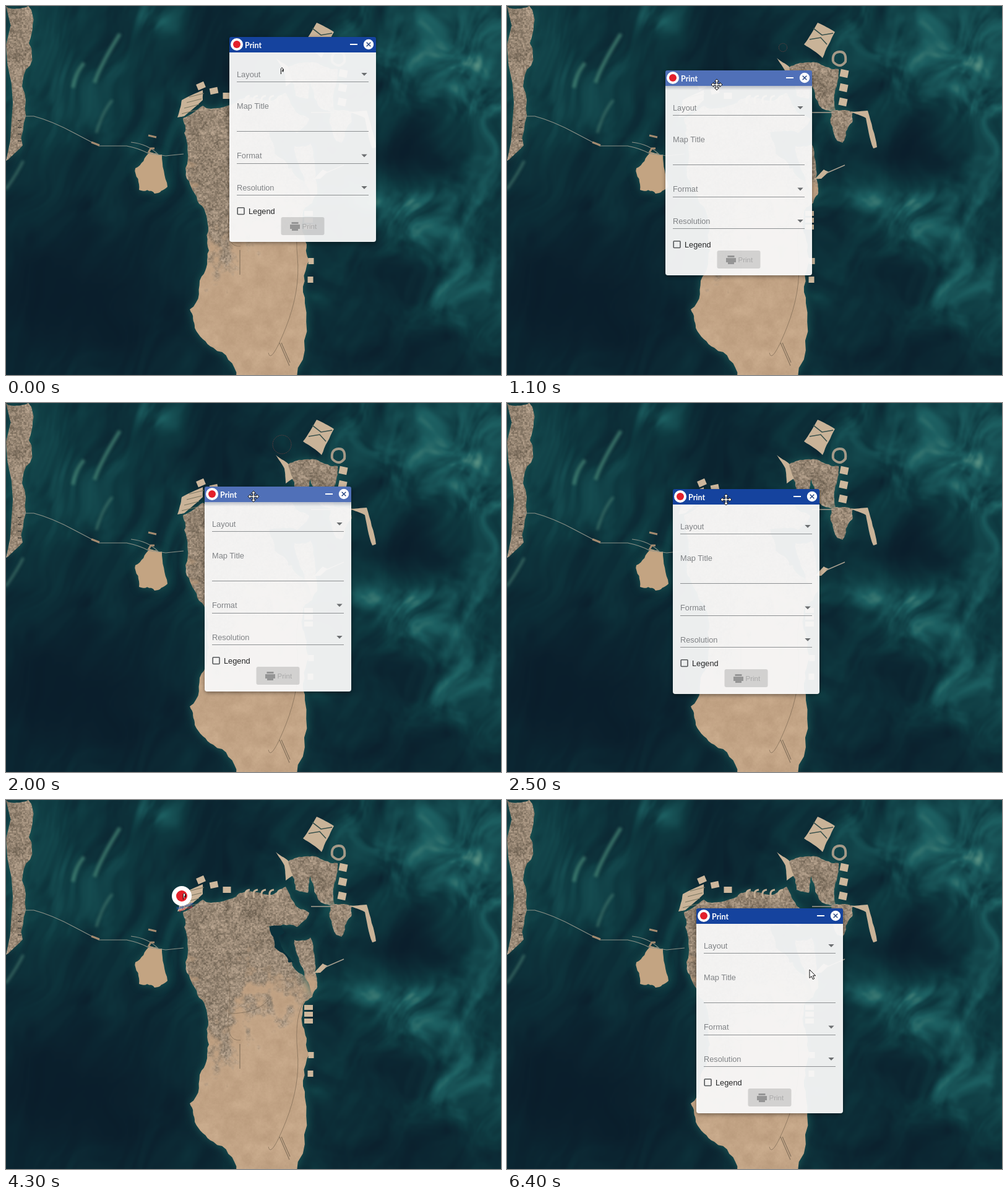
Animation of 800 by 596 pixels, one loop 6.5 s. Source, as an HTML page with a canvas:

```html
<!DOCTYPE html>
<html lang="en">
<head>
<meta charset="utf-8">
<title>Movable print panel</title>
<style>
html, body { margin: 0; width: 100%; height: 100%; overflow: hidden; background: #0b2c38; }
canvas, svg { position: absolute; left: 0; top: 0; width: 800px; height: 596px; }
svg { overflow: hidden; font-family: "Liberation Sans", Arial, sans-serif; font-size: 12.8px; }
#panel { filter: drop-shadow(0 2px 3px rgba(0, 0, 0, .45)); }
.label { fill: #808386; }
.rule { stroke: #8e9193; }
.title { font: 700 12.5px Lato, "Open Sans", sans-serif; fill: #fff; }
</style>
</head>
<body>
<canvas id="map" width="800" height="596"></canvas>
<svg viewBox="0 0 800 596">
  <defs>
    <linearGradient id="shade" x2="0" y2="1">
      <stop stop-color="#304060" stop-opacity=".28"/>
      <stop offset="1" stop-color="#304060" stop-opacity="0"/>
    </linearGradient>
  </defs>
  <circle id="ring" cx="446" cy="67" fill="none" stroke="#7a4240" stroke-opacity=".65" stroke-dasharray="2 1"/>
  <g id="panel">
    <path d="M0 25H237V327Q237 331 233 331H4Q0 331 0 327Z" fill="#fff" fill-opacity=".925"/>
    <path id="head" d="M0 25V3Q0 0 3 0H234Q237 0 237 3V25Z"/>
    <rect id="under" y="25" width="237" height="7" fill="url(#shade)"/>
    <circle cx="12" cy="12" r="10" fill="#fff"/>
    <circle cx="12" cy="12" r="6" fill="#e3202b"/>
    <text class="title" x="25" y="17.5">Print</text>
    <path d="M195 12H207" stroke="#fff" stroke-width="2"/>
    <circle cx="225" cy="12" r="8.2" fill="#fff"/>
    <path d="M221.7 8.7l6.6 6.6m0-6.6l-6.6 6.6" stroke="#23437f" stroke-width="1.4"/>
    <g id="fields"></g>
    <rect x="13.2" y="275.7" width="10.8" height="10.8" rx="1" fill="none" stroke="#55585a" stroke-width="1.6"/>
    <text x="31" y="285.5" fill="#232425">Legend</text>
    <rect x="83.5" y="291" width="70" height="29" rx="3" fill="#000" fill-opacity=".14"/>
    <path d="M100.5 299h11v3h-11zM98 303h16v7h-3v3h-10v-3h-3z" fill="#959595"/>
    <text x="117.5" y="309.5" font-size="11.5" fill="#a9a9a9">Print</text>
  </g>
  <g id="badge">
    <g id="caption" text-anchor="middle" font-size="6" font-weight="700">
      <text y="19" fill="#2450a8">Map tools</text>
      <text y="23" font-size="5" fill="#c8303c">print map</text>
    </g>
    <circle r="16" fill="#fff"/>
    <circle r="9" fill="#e3202b"/>
  </g>
  <g id="cursor" fill="#fff" stroke="#111" stroke-linejoin="round">
    <path id="arrow" d="M0 0V13.5L3.1 10.7L5.3 15.6L7.6 14.6L5.4 9.8H9.6Z"/>
    <path id="move" d="M0-9L3.5-5H1.2V-1.2H5V-3.5L9 0L5 3.5V1.2H1.2V5H3.5L0 9L-3.5 5H-1.2V1.2H-5V3.5L-9 0L-5-3.5V-1.2H-1.2V-5H-3.5Z"/>
    <path id="hand" d="M-1.6 10V1Q0-2 1.6 1V6.3Q4-1 0 5.5 4.6 7Q6.8 6 7.4 8Q9.3 7.7 9.3 9.7V13Q9.3 15 7.6 18.3H-.5Q-2.8 14.7-5.3 12Q-6.5 9-1.6 11Z"/>
  </g>
</svg>
<script>
const $ = id => document.getElementById(id);
const clamp = (v, a = 0, b = 1) => Math.min(b, Math.max(a, v));
const mix = (a, b, u) => a.map((v, i) => v + (b[i] - v) * u);

// ---- seeded noise ----
const fract = v => v - Math.floor(v);
const hash = (x, y) => fract(Math.sin(x * 127.1 + y * 311.7) * 43758.5);
function noise(x, y) {
  const i = Math.floor(x), j = Math.floor(y);
  const ease = u => u * u * (3 - 2 * u), u = ease(x - i), v = ease(y - j);
  const a = hash(i, j), b = hash(i + 1, j), c = hash(i, j + 1), d = hash(i + 1, j + 1);
  return a + (b - a) * u + (c - a) * v + (a - b - c + d) * u * v;
}
const fbm = (x, y) => (noise(x, y) * 4 + noise(x * 2, y * 2) * 2 + noise(x * 4, y * 4)) / 7;

// ---- satellite picture, painted once ----
const W = 800, H = 596, g = $('map').getContext('2d');

// Paints a canvas from a colour function; cell is the sample size
function paint(color, cell) {
  const c = document.createElement('canvas');
  c.width = W / cell;
  c.height = H / cell;
  const p = c.getContext('2d'), img = p.createImageData(c.width, c.height);
  for (let i = 0; i < img.data.length; i += 4) {
    const k = i / 4;
    img.data.set([...color(k % c.width * cell, Math.floor(k / c.width) * cell), 255], i);
  }
  p.putImageData(img, 0, 0);
  return c;
}

const depths = [[10, 28, 42], [14, 57, 64], [29, 96, 98], [92, 148, 133]];
// x, y, radii, brightness
const shoals = [
  [110, 120, 190, 150, .1], [252, 20, 32, 28, .4], [110, 470, 210, 150, -.2], [370, 75, 100, 75, -.13],
  [630, 70, 120, 120, .24], [780, 140, 100, 180, .32], [680, 232, 85, 42, -.3], [595, 305, 100, 34, .34],
  [690, 370, 75, 60, .3], [622, 435, 34, 30, -.14], [750, 465, 80, 70, .22], [640, 575, 180, 50, -.13],
  [275, 260, 28, 80, .1]];

function seaColor(x, y) {
  const wx = x + 50 * (noise(x / 60, y / 60) - .5), wy = y + 50 * (noise(x / 60 + 9, y / 60) - .5);
  let light = .22;
  for (const [cx, cy, rx, ry, a] of shoals) light += a * Math.exp(-(((wx - cx) / rx) ** 2) - ((wy - cy) / ry) ** 2);
  const streak = fbm((wx + wy * .5) / 24, (wy - wx * .5) / 85) - .5;
  const mottle = fbm(wx / 30, wy / 30) - .5;
  light = clamp(light + (x < 350 ? streak : (streak + mottle) / 1.5) * clamp(light * 1.6), 0, .99) * 3;
  const i = Math.floor(light);
  return mix(depths[i], depths[i + 1], light - i);
}

function landColor(x, y) {
  const n = fbm(x / 17, y / 17), grain = fbm(x / 2.4, y / 2.4);
  const edge = 322 + 110 * Math.exp(-(((x - 342) / 32) ** 2));
  const town = clamp((edge - y) / 70 + (n - .5) * 3.5 + .2);
  const sand = mix([181, 150, 120], [206, 176, 145], clamp(n * .8 + grain * .3));
  return mix(sand, mix([84, 76, 64], [189, 170, 150], clamp(grain * 1.1 + (n - .5) * .5)), town * .85);
}

// Closed outline through key points, roughened by midpoint displacement
function coast(text, rough = .12) {
  let pts = text.split(',').map(p => p.split(' ').map(Number));
  for (let pass = 0; pass < 3; pass++) {
    pts = pts.flatMap(([x, y], i) => {
      const [u, v] = pts[(i + 1) % pts.length], k = (hash(x, y) - .5) * rough * 2;
      return [[x, y], [(x + u) / 2 + (v - y) * k, (y + v) / 2 - (u - x) * k]];
    });
  }
  return new Path2D('M' + pts.join('L') + 'Z');
}

function fill(shape, style) {
  g.fillStyle = style;
  g.fill(shape);
}

function block(x, y, w, h, turn = 0) {
  g.save();
  g.translate(x, y);
  g.rotate(turn);
  g.fillStyle = '#cdb79c';
  g.fillRect(-w / 2, -h / 2, w, h);
  g.restore();
}

function line(d, color, width, alpha = 1) {
  g.globalAlpha = alpha;
  g.strokeStyle = color;
  g.lineWidth = width;
  g.stroke(new Path2D(d));
  g.globalAlpha = 1;
}

function paintMap() {
  g.drawImage(paint(seaColor, 2), 0, 0, W, H);
  g.filter = 'blur(2px)';
  line('M108 132Q112 108 126 92M143 124Q152 96 184 45', '#4b8a7a', 6, .7);
  line('M146 205Q156 170 172 152M0 296Q18 270 28 250', '#508778', 4, .6);
  g.filter = 'none';

  const soil = g.createPattern(paint(landColor, 1), 'no-repeat');
  g.shadowColor = '#1c5b59';
  g.shadowBlur = 14;
  [
    '286 181,318 161,372 156,388 147,430 153,452 140,466 166,490 182,470 205,425 204,444 238,462 262,490 290,495 318,484 325,482 370,490 410,483 480,470 600,372 600,335 552,305 520,297 490,316 437,328 395,325 345,305 303,290 262,288 205',
    '0 0,36 0,37 60,26 130,27 225,0 250',
    '466 226,492 222,499 278,502 305,494 317,480 272',
    '450 104,478 92,505 93,536 102,530 140,532 172,515 168,492 123,488 150,468 145,466 128',
    '524 171,560 171,558 188,542 221,534 218'
  ].forEach(s => fill(coast(s), soil));
  fill(coast('209 262,232 236,252 240,261 292,240 303,215 297'), '#c3a482');
  g.shadowBlur = 0;
  [
    '436 84,456 98,464 122,452 130,450 106', '502 27,530 42,510 84,480 62',
    '555 171,583 169,598 228,592 230,580 181', '277 180,284 152,318 136,318 152,288 178',
    '497 280,512 264,520 268,508 279'
  ].forEach(s => fill(coast(s, .03), '#c9b398'));

  // Reclaimed plots and piers
  for (let i = 0; i < 3; i++) {
    block(315 + i * 21, 129 + i * 8, 13, 10, -.4 + i * .2);
    block(545 - i, 109 + i * 23, 13, 12, .2);
    block(489, 335 + i * 11, 14, 8);
  }
  for (let i = 0; i < 2; i++) block(493 - i, 412 + i * 30, 9, 10);
  for (let i = 0; i < 5; i++) line(`M${388 + i * 13} 158q-4-12 6-13`, '#c2ad94', 3);
  for (let i = 0; i < 4; i++) line(`M${284 + i * 4} ${174 - i * 9}l24-6`, '#78745e', 1);
  for (let i = 0; i < 4; i++) line(`M25 ${185 + i * 11}h-6`, '#564f46', 2);
  line('M527 90Q525 75 537 74T547 90Q538 102 527 90', '#a59a88', 4);

  // Inlets, roads, runway, causeway
  fill(coast('426 205,446 203,450 214,440 220,444 232,466 262,456 262,434 238'), '#0a303a');
  line('M495 36l14 11 18-3m-38 10l18-3 10 11', '#38504b', 1.6);
  line('M352 258Q366 300 360 345T379 388M360 345Q410 345 428 318M482 325Q466 350 471 405T452 520T424 560', '#7d6a55', 1, .7);
  line('M442 544l16 37m-13-37l14 32M378 394v40', '#766653', 1.2, .8);
  line('M493 172H530M516 270L546 257', '#a9a090', 1.4);
  line('M27 178H45Q75 186 110 205L150 226H195Q215 230 230 238L258 242L287 239M202 220Q230 223 246 240', '#8c9187', 1.2);
  line('M138 220l13 5m79-16l13 3m-13 25l4-7h6', '#a58b70', 3);
}
paintMap();

// ---- form fields ----
const fields = [['Layout', 64.5, 72.5, 1], ['Map Title', 115.5, 152.5, 0], ['Format', 196, 204.5, 1], ['Resolution', 247.5, 255.5, 1]];
$('fields').innerHTML = fields.map(([name, base, rule, menu]) =>
  `<text class="label" x="12" y="${base}">${name}</text><path class="rule" d="M12 ${rule}H225"/>` +
  (menu ? `<path d="M213.3 ${base - 6.5}h9.4l-4.7 4.8z" fill="#6c6f71"/>` : '')).join('');

// ---- motion ----
const LOOP = 6500, STEP = 100, LAG = 40;
const GRAB = 600, DROP = 2300, CLOSE = 3200, LIFT = 4300, REST = 4900, OPEN = 5500;
// time, x, y of the pointer
const route = [[0, 446, 100], [400, 447, 67], [GRAB, 447, 67], [1100, 339, 127], [1600, 423, 203], [1900, 415, 155],
  [DROP, 354, 156], [2600, 354, 156], [3000, 469, 151], [3400, 465, 151], [4100, 288, 151], [LIFT, 288, 151],
  [REST, 326, 187], [OPEN, 326, 187], [6300, 489, 274], [LOOP, 489, 274]];

// Speed at a key: zero beside a pause, else the slope across its neighbours
function slope(i, axis) {
  const a = route[i - 1], b = route[i], c = route[i + 1];
  const still = (p, q) => p[1] === q[1] && p[2] === q[2];
  if (!a || !c || still(a, b) || still(b, c)) return 0;
  return (c[axis] - a[axis]) / (c[0] - a[0]);
}

function pointer(t) {
  const i = Math.max(1, route.findIndex(k => k[0] > t));
  const a = route[i - 1], b = route[i], d = b[0] - a[0], u = (t - a[0]) / d, e = u * u * (3 - 2 * u);
  return [1, 2].map(n => a[n] + (b[n] - a[n]) * e +
    d * u * (1 - u) * (slope(i - 1, n) * (1 - u) - slope(i, n) * u));
}

// The panel trails the pointer while held
function panelAt(t) {
  const second = t >= LIFT;
  const [x, y] = pointer(second ? clamp(t - LAG, LIFT, REST) : clamp(t - LAG, GRAB, DROP));
  return second ? [x - 20, y - 12] : [x - 86, y - 17];
}

const show = (id, on) => $(id).setAttribute('display', on ? 'inline' : 'none');
const place = (id, [x, y], shift = 0) =>
  $(id).setAttribute('transform', `translate(${Math.round(x) + shift} ${Math.round(y) + shift})`);

function cursorKind(t) {
  if (t < 200 || (t >= 4000 && t < OPEN + 100)) return 'hand';
  return t >= 400 && t < 2700 ? 'move' : 'arrow';
}

function draw(t) {
  const spot = panelAt(t), small = t >= CLOSE && t < OPEN, held = t >= GRAB && t < DROP;
  show('panel', !small);
  show('badge', small);
  place('panel', spot);
  place('badge', spot, 16);
  $('caption').setAttribute('transform', `rotate(${-18 * clamp((REST - t) / (REST - LIFT))})`);
  $('head').setAttribute('fill', held ? '#5070b8' : '#15439e');
  show('under', held);
  show('ring', t > GRAB + 100 && t < 2100);
  $('ring').setAttribute('r', clamp((t - GRAB - 100) / 60, 0, 15));
  place('cursor', pointer(t));
  for (const id of ['arrow', 'move', 'hand']) show(id, id === cursorKind(t));
}

let last = -1;
function tick() {
  const t = Math.floor(performance.now() % LOOP / STEP) * STEP;
  if (t !== last) draw(last = t);
  requestAnimationFrame(tick);
}
tick();
</script>
</body>
</html>
```
